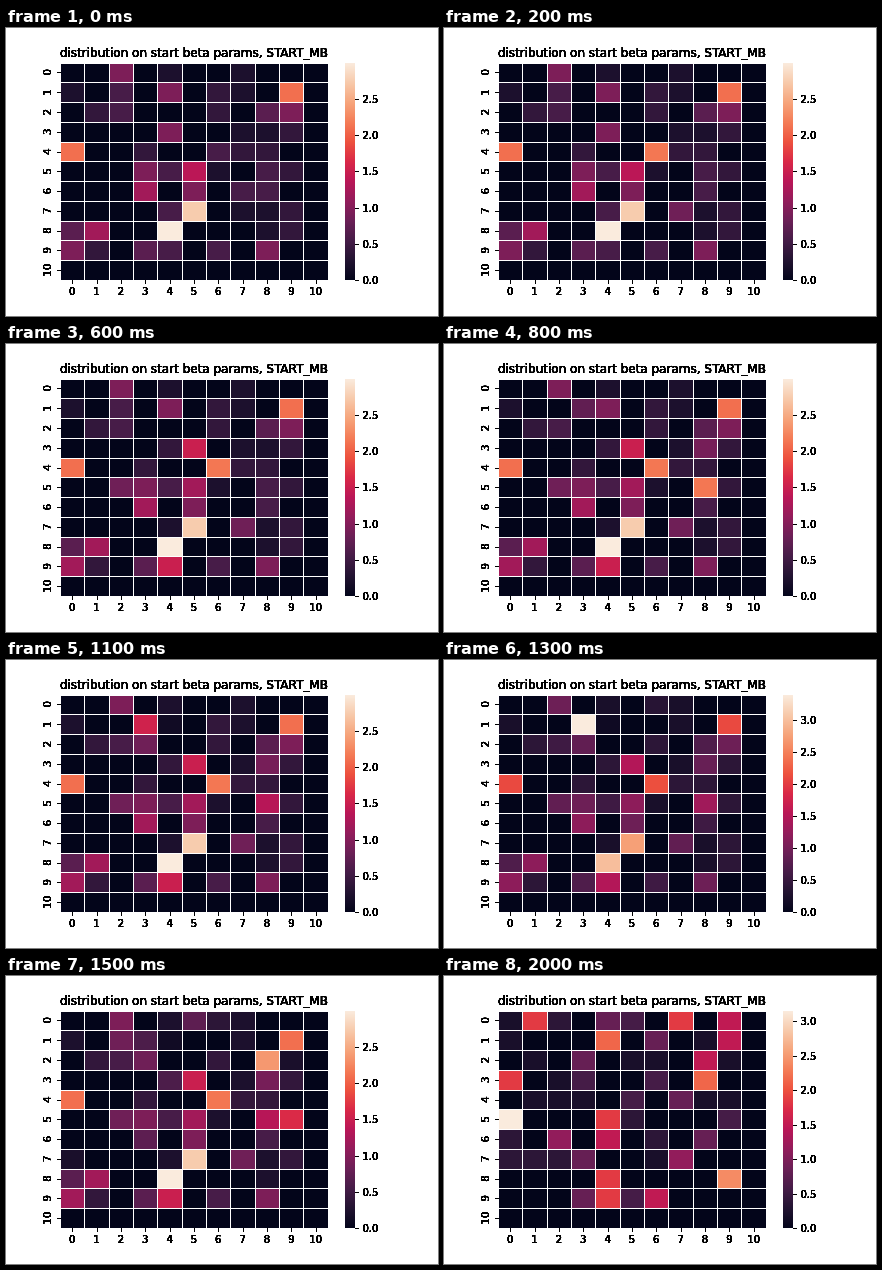
Animation, 432 px wide and 288 px high, one loop 2.1 s. Source, as an HTML page with a canvas:

```html
<!DOCTYPE html>
<html lang="en">
<head>
<meta charset="utf-8">
<title>Heatmap</title>
<style>
  html, body { margin: 0; width: 100%; height: 100%; overflow: hidden; background: #fff; }
  canvas { display: block; }
</style>
</head>
<body>
<canvas id="stage" width="432" height="288"></canvas>
<script>
const ctx = document.getElementById('stage').getContext('2d');
const LOOP = 2100, N = 11;
const plot = { x: 54, y: 34.56, w: 267.84, h: 217.44 };
const bar = { x: 339, y: 35, w: 10, h: 217 };
const edgeX = i => Math.round(plot.x + plot.w * i / N);
const edgeY = i => Math.round(plot.y + plot.h * i / N);

const emptyGrid = () => Array.from({ length: N }, () => Array(N).fill(0));

// Sets blocks of cells to one level; a block is [row, column, height, width].
function paint(grid, level, ...blocks) {
  for (const [row, col, h = 1, w = 1] of blocks) {
    for (let r = row; r < row + h; r++) grid[r].fill(level, col, col + w);
  }
}

function opening() {
  const g = emptyGrid();
  paint(g, 0.22, [0, 4], [1, 0], [0, 7, 2], [3, 7], [7, 7], [3, 8, 6], [5, 6]);
  paint(g, 0.4, [4, 7, 1, 2], [3, 9], [5, 9], [7, 9, 2], [1, 6, 2], [2, 1], [4, 3], [9, 1]);
  paint(g, 0.56, [1, 2, 2], [5, 8, 2], [5, 4], [7, 4], [9, 4], [6, 7], [4, 6], [9, 6]);
  paint(g, 0.7, [2, 8], [8, 0], [9, 3]);
  paint(g, 0.95, [0, 2], [1, 4], [2, 9], [3, 4], [5, 3], [6, 5], [9, 0], [9, 8]);
  paint(g, 1.2, [6, 3], [8, 1]);
  paint(g, 1.38, [5, 5]);
  paint(g, 2.1, [1, 9], [4, 0]);
  paint(g, 2.75, [7, 5]);
  paint(g, 3, [8, 4]);
  return g;
}

function closing() {
  const g = emptyGrid();
  paint(g, 0.2, [0, 0, 2], [2, 1], [4, 1, 1, 3], [3, 2], [1, 8], [2, 5, 1, 2], [4, 8, 1, 2], [2, 9], [7, 6]);
  paint(g, 0.37, [0, 2], [7, 0, 1, 3], [5, 5], [6, 0], [6, 6]);
  paint(g, 0.57, [0, 5], [3, 3], [4, 5], [9, 5], [3, 6], [5, 9]);
  paint(g, 0.83, [0, 4], [1, 6], [2, 3], [4, 7], [6, 8], [7, 3], [9, 3]);
  paint(g, 1.15, [6, 2], [7, 7]);
  paint(g, 1.5, [0, 9, 2], [2, 8], [6, 4], [9, 6]);
  paint(g, 1.85, [0, 1], [0, 7], [3, 0], [5, 4], [8, 4, 2]);
  paint(g, 2.15, [1, 4], [3, 8]);
  paint(g, 2.4, [8, 9]);
  paint(g, 3.155, [5, 0]);
  return g;
}

const states = [{ time: 0, grid: opening() }];

// Carries the grid on with some levels changed.
function step(time, ...changes) {
  const grid = states[states.length - 1].grid.map(row => [...row]);
  for (const change of changes) paint(grid, ...change);
  states.push({ time, grid });
}

step(200, [2.15, [4, 6]], [0, [6, 7]], [0.85, [7, 7]]);
step(400, [0.4, [3, 4]], [1.5, [3, 5]], [0.22, [7, 4]]);
step(500, [0.85, [5, 2]], [1.2, [5, 5]]);
step(600, [1.2, [9, 0]], [1.5, [9, 4]]);
step(700, [0.9, [3, 8]], [2.15, [5, 8]]);
step(800, [0, [1, 2]], [0.75, [1, 3]]);
step(900, [0.85, [2, 3]], [1.35, [5, 8]]);
step(1000, [1.55, [1, 3]], [0.12, [1, 4]]);
step(1200, [0.35, [0, 6]], [0, [1, 6]]);
step(1300, [3.4, [1, 3]]);
step(1400, [0.85, [1, 2]], [0.6, [1, 3]], [0.72, [0, 5], [6, 3]]);
step(1500, [2.37, [2, 8]], [0.2, [2, 9], [7, 0]], [0.6, [3, 4]], [1.65, [5, 9]], [0, [8, 9]]);
states.push({ time: 2000, grid: closing() });

const ramp = '03051a 221331 451c47 6a1f56 921c5b b91657 d92847 ed513e f47c56 f6a47b f7c9aa faebdd'
  .split(' ').map(hex => [0, 2, 4].map(k => parseInt(hex.slice(k, k + 2), 16)));

function color(t) {
  const pos = t * (ramp.length - 1);
  const i = Math.min(Math.floor(pos), ramp.length - 2);
  return `rgb(${ramp[i].map((v, j) => Math.round(v + (ramp[i + 1][j] - v) * (pos - i)))})`;
}

// Repeated passes saturate the soft edges of the lettering.
function label(text, x, y, size, align = 'center', angle = 0) {
  ctx.save();
  ctx.translate(x, y);
  ctx.rotate(angle);
  ctx.font = `${size}px "DejaVu Sans", sans-serif`;
  ctx.textAlign = align;
  ctx.fillStyle = '#000';
  for (let pass = 0; pass < 12; pass++) ctx.fillText(text, 0, 0);
  ctx.restore();
}

function tick(x, y, w, h) {
  ctx.fillStyle = '#000';
  ctx.fillRect(x, y, w, h);
}

function drawCells(grid, max) {
  grid.forEach((row, r) => row.forEach((value, c) => {
    const x = edgeX(c) + 1, y = edgeY(r) + 1;
    ctx.fillStyle = color(value / max);
    ctx.fillRect(x, y, edgeX(c + 1) - x, edgeY(r + 1) - y);
  }));
}

function drawAxes() {
  label('distribution on start beta params, START_MB', plot.x + plot.w / 2, 29, 12);
  for (let i = 0; i < N; i++) {
    const x = plot.x + plot.w * (i + 0.5) / N;
    const y = plot.y + plot.h * (i + 0.5) / N;
    tick(Math.round(x), 252, 1, 4);
    label(i, x, 267, 10);
    tick(51, Math.round(y), 4, 1);
    label(i, 45, y, 10, 'center', -Math.PI / 2);
  }
}

function drawBar(max) {
  for (let i = 0; i < bar.h; i++) {
    ctx.fillStyle = color(1 - (i + 0.5) / bar.h);
    ctx.fillRect(bar.x, bar.y + i, bar.w, 1);
  }
  for (let v = 0; v < max; v += 0.5) {
    const y = Math.round(252 - plot.h * v / max);
    if (y <= bar.y) break;
    tick(349, y, 4, 1);
    label(v.toFixed(1), 356.45, y + 4, 10, 'left');
  }
}

let shown = null;
function frame(now) {
  const t = now % LOOP;
  const state = states.findLast(s => s.time <= t);
  if (state !== shown) {
    shown = state;
    const max = Math.max(...state.grid.flat());
    ctx.fillStyle = '#fff';
    ctx.fillRect(0, 0, 432, 288);
    drawCells(state.grid, max);
    drawAxes();
    drawBar(max);
  }
  requestAnimationFrame(frame);
}
frame(0);
</script>
</body>
</html>
```
